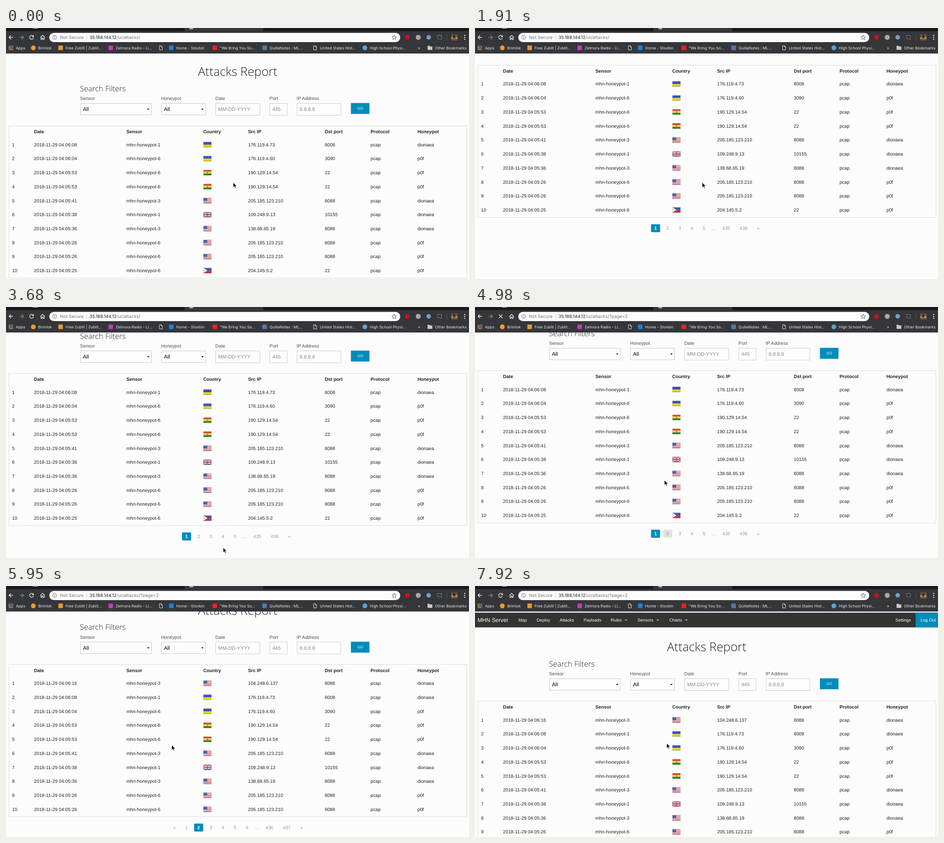
Animation of 1017x551 px, one loop 8000 ms. Source, as an HTML page:

```html
<!DOCTYPE html>
<html lang="en">
<head>
<meta charset="utf-8">
<title>Attacks Report</title>
<style>
html, body { margin: 0; width: 100%; height: 100%; overflow: hidden; background: #fcfcfc; }
svg { display: block; width: 1017px; height: 551px; }
text { font-family: "Liberation Sans", Arial, sans-serif; font-size: 10.25px; fill: #222; text-rendering: geometricPrecision; white-space: pre; }
.b { font-weight: bold; }
.title { font: 300 26.7px "Open Sans", sans-serif; }
.sub { font: 300 16.8px "Open Sans", sans-serif; }
.label { fill: #4d4d4d; }
.pick { font-size: 11.7px; fill: #000; }
.hint { font-size: 11px; fill: #888; }
.go { font-size: 8px; fill: #fff; }
.mid { text-anchor: middle; }
.dim { fill: #999; }
.white { fill: #fff; }
.brand { font-size: 12.3px; fill: #fff; }
.nav { font-size: 9.5px; fill: #fff; }
.mark { font: 8.45px Inter, Roboto, sans-serif; fill: #e8eaed; }
.url { font: 9.75px Inter, Roboto, sans-serif; fill: #202124; }
.soft { fill: #6f7377; }
</style>
</head>
<body>
<svg id="stage" viewBox="0 0 1017 551" xmlns="http://www.w3.org/2000/svg"></svg>
<script>
const BLUE = '#008cba', BAR = '#35363a', PALE = '#e8eaed', GREY = '#6f7377';

const text = (x, y, s, cls = '') => `<text x="${x}" y="${y}" class="${cls}">${s}</text>`;
const rect = (x, y, w, h, fill, more = '') =>
  `<rect x="${x}" y="${y}" width="${w}" height="${h}" fill="${fill}" ${more}/>`;
const dot = (x, y, r, fill) => `<circle cx="${x}" cy="${y}" r="${r}" fill="${fill}"/>`;
const line = (d, stroke, w = 1) => `<path d="${d}" fill="none" stroke="${stroke}" stroke-width="${w}"/>`;
const fill = (d, color) => `<path d="${d}" fill="${color}"/>`;
const times = (n, make) => Array.from({ length: n }, (_, i) => make(i)).join('');
const labels = (list, y, cls) => list.map(([s, x]) => text(x, y, s, cls)).join('');

// country flags, 18 by 12
const bands = (...colors) => colors.map((c, i) =>
  rect(0, i * 12 / colors.length, 18, 12 / colors.length, c)).join('');
const stripes = Array.from({ length: 9 }, (_, i) => i % 2 ? '#f6eeee' : '#cf3842');
const flags = {
  ua: bands('#3040b4', '#e9d820'),
  bo: bands('#d22f28', '#f0dc2c', '#27842b') + dot(9, 6, 1.6, '#a8762c'),
  us: bands(...stripes) + rect(0, 0, 8.5, 6.6, '#4256a2'),
  gb: rect(0, 0, 18, 12, '#243a94') + line('M0 0L18 12M18 0L0 12', '#f4f4f8', 2.4) +
    line('M0 0L18 12M18 0L0 12', '#d0303c', .8) + line('M9 0V12M0 6H18', '#f8f8fa', 4) +
    line('M9 0V12M0 6H18', '#d0303c', 2.2),
  ph: bands('#244ab2', '#d02a36') + fill('M0 0L9 6L0 12Z', '#f6f6f6') + dot(3, 6, 1.4, '#ecc93a')
};
const gloss = `<linearGradient id="gloss" x2="0" y2="1"><stop offset="0" stop-color="#fff" stop-opacity=".18"/>
  <stop offset=".5" stop-color="#fff" stop-opacity="0"/><stop offset="1" stop-opacity=".15"/></linearGradient>`;
const defs = '<defs>' + gloss + Object.entries(flags).map(([id, art]) =>
  `<symbol id="${id}" viewBox="0 0 18 12">${art}${rect(0, 0, 18, 12, 'url(#gloss)')}
  ${rect(.3, .3, 17.4, 11.4, 'none', 'stroke="#000" stroke-opacity=".3" stroke-width=".6"')}</symbol>`).join('') + '</defs>';

// time, sensor, country, address, port, honeypot
const attacks = [
  ['06:16', 3, 'us', '104.248.6.137', 8088, 'dionaea'],
  ['06:08', 1, 'ua', '176.119.4.73', 8008, 'dionaea'],
  ['06:04', 6, 'ua', '176.119.4.60', 3090, 'p0f'],
  ['05:53', 6, 'bo', '190.129.14.54', 22, 'p0f'],
  ['05:53', 6, 'bo', '190.129.14.54', 22, 'p0f'],
  ['05:41', 3, 'us', '205.185.123.210', 8088, 'dionaea'],
  ['05:38', 1, 'gb', '109.248.9.13', 10155, 'dionaea'],
  ['05:36', 3, 'us', '138.68.65.19', 8088, 'dionaea'],
  ['05:26', 6, 'us', '205.185.123.210', 8088, 'p0f'],
  ['05:26', 6, 'us', '205.185.123.210', 8088, 'p0f'],
  ['05:25', 6, 'ph', '204.145.5.2', 22, 'p0f']
];
const columns = [['Date', 61.5], ['Sensor', 264.5], ['Country', 433.2], ['Src IP', 531.7], ['Dst port', 700.2],
  ['Protocol', 800.7], ['Honeypot', 903.7]];

function row([time, sensor, flag, ip, port, pot], i) {
  const mid = 294 + i * 30.73, y = mid + 3.6;
  const cells = ['2018-11-29 04:' + time, 'mhn-honeypot-' + sensor, '', ip, port, 'pcap', pot];
  return text(13.3, y, i + 1) + cells.map((s, j) => text(columns[j][1], y, s)).join('') +
    `<use href="#${flag}" x="433.5" y="${mid - 6}" width="18" height="12"/>`;
}

function pager(names, current) {
  const items = names.split(' ');
  const size = s => s === '…' ? 16.6 : s.length * 5.7 + 20.9;
  let x = 509.4 - items.reduce((sum, s) => sum + size(s), 0) / 2;
  return items.map(s => {
    const mid = x + size(s) / 2, on = s === current;
    x += size(s);
    const box = on ? BLUE : s === '2' ? '#e2e2e2' : '';
    return (box && rect(mid - 10, 601.8, 20, 17.6, box, `rx="2" ${on ? '' : 'class="hover"'}`)) +
      text(mid, 614.2, s, on ? 'mid b white' : 'mid dim');
  }).join('');
}

const page = (id, list, names, current) =>
  `<g id="${id}">${list.map(row).join('')}${pager(names, current)}</g>`;

const field = (x, w, hint) =>
  rect(x + .5, 203.5, w - 1, 26, '#fdfdfd', 'stroke="#ccc"') + text(x + 6, 220.4, hint, 'hint');
const picker = (x, w) => rect(x + .5, 203.5, w - 1, 25.3, '#fdfdfd', 'stroke="#c8c8c8"') +
  text(x + 6, 220.3, 'All', 'pick') + fill(`M${x + w - 10} 215h5l-2.5 3z`, '#000');

const menu = [['Map', 95.2], ['Deploy', 135.5], ['Attacks', 186], ['Payloads', 238.4], ['Rules', 298], ['Sensors', 357],
  ['Charts', 426.7], ['Settings', 923.3], ['Log Out', 978.7]];
const navBar = rect(0, 58.5, 1017, 32.3, '#333') + rect(968, 58.5, 49, 32.3, BLUE) +
  text(5.5, 79.2, 'MHN Server', 'brand') + labels(menu, 78.2, 'nav') +
  [328, 398, 460.5].map(x => fill(`M${x} 73.2h7.4l-3.7 3.7z`, '#999')).join('');

const form = text(509, 143, 'Attacks Report', 'title mid') + text(162.3, 176.6, 'Search Filters', 'sub') +
  labels([['Sensor', 162.6], ['Honeypot', 340.7], ['Date', 459.8], ['Port', 578.8], ['IP Address', 638.3]], 196, 'label') +
  picker(163, 157) + picker(341, 98) + field(460, 98, 'MM-DD-YYYY') + field(579, 39, '445') + field(639, 97, '8.8.8.8') +
  rect(757.6, 202.7, 40.8, 24, BLUE) + text(778.2, 217.4, 'GO', 'go mid');

const table = rect(6.5, 252.8, 1006, 334, 'none', 'stroke="#ddd"') + labels(columns, 269.1, 'b');

// browser frame
const tabs = rect(0, 0, 1017, 56, BAR) + rect(0, 0, 392, 7, '#191a1d') + rect(565, 0, 452, 7, '#191a1d') +
  rect(59, 0, 11, 1, '#ddd') + rect(403, 0, 8, 3, '#a9abae');

const tools = line('M15.5 20.5H7M11 16.3L6.8 20.5L11 24.7', PALE, 1.4) +
  line('M30 20.5H38.5M34.3 16.3L38.5 20.5L34.3 24.7', '#85878b', 1.4) +
  `<g id="reload">${line('M59.7 17.8A4.3 4.3 0 1 0 60.5 21.6', PALE, 1.4)}${fill('M61 15.6V20H56.6Z', PALE)}</g>` +
  `<g id="stop">${line('M52.5 16.5l8 8m0-8l-8 8', PALE, 1.4)}</g>` +
  line('M75.5 20.8L80.5 16L85.5 20.8M77 20V25H79.3V21.8H81.7V25H84V20', PALE, 1.3) +
  rect(95, 10.7, 771, 20.2, '#fcfcfc', 'rx="10.1"') +
  line('M111.2 20.7a4.2 4.2 0 1 1-8.4 0a4.2 4.2 0 1 1 8.4 0M107 20.2V23M107 18V19.2', GREY, 1.1) +
  text(118.8, 24.2, 'Not Secure', 'url soft') + rect(176.5, 15.5, 1, 10.5, '#c4c6c8') +
  '<text x="183.4" y="24.2" class="url">35.188.144.12<tspan class="soft" id="path"></tspan></text>' +
  line('M852.8 15.6l1.5 3.4 3.7.3-2.8 2.4.9 3.6-3.3-1.9-3.3 1.9.9-3.6-2.8-2.4 3.7-.3z', '#5f6368') +
  dot(882, 20.5, 5.2, '#c3151c') + dot(905.5, 20.5, 5.5, '#a6a8aa') + dot(928.5, 20.5, 5, '#6f9fc8') +
  line('M946.5 18V16.5h10v8H952M946.5 20.5a4 4 0 0 1 4 4M946.5 23a1.5 1.5 0 0 1 1.5 1.5', '#85888c') +
  rect(968, 14, 1, 13, '#505156') +
  rect(978, 14, 14, 13.5, '#6d5638', 'rx="1.5"') + rect(978, 20, 14, 4, '#a98c60') + rect(982, 15.5, 5, 7, '#3d2f22') +
  times(3, i => dot(1007.5, 16.2 + i * 4.3, 1.2, PALE));

const sheet = x => line(`M${x - 3} 39h4l2.5 2.5v6.5h-6.5zM${x + 1} 39v2.5h2.5`, PALE);
const block = color => x => rect(x - 5, 38.5, 10, 10, color, 'rx="1"');
const disc = color => x => dot(x, 43.5, 5.2, color);
const folder = x => fill(`M${x - 5.5} 39h4l1.2 1.5h5.3v7.5h-10.5z`, '#c8cacc');
const grid = x => times(9, i => rect(x - 5 + i % 3 * 3.6, 38.6 + Math.floor(i / 3) * 3.6, 2.6, 2.6,
  ['#e25a4e', '#e8b53a', '#56a867', '#5a8fe0'][i * 3 % 4]));
const bookmarks = [
  [11, grid, 'Apps'], [60, disc('#f39a2b'), 'Brimlok'], [120, block('#e8963c'), 'Free Zublit | Zublit…'],
  [230, block('#c43bb4'), 'Zelmora Radio - Li…'], [340, sheet, ''], [363, block('#1684e6'), 'Home - Stovbin'],
  [458.7, block('#f0201c'), '"We Bring You So…'], [568, block('#5878a4'), 'QuillaNotes : ML…'],
  [678.7, sheet, 'United States Hist…'], [788.3, disc('#5aa5d8'), 'High School Physi…'], [894, () => '', '»'],
  [931.5, folder, 'Other Bookmarks']
].map(([x, icon, name]) => icon(x) + text(x + 10.8, 46.5, name, 'mark')).join('');

const stage = document.getElementById('stage');
stage.innerHTML = defs + rect(0, 0, 1017, 551, '#fcfcfc') + '<g id="page">' + navBar + form + table +
  page('first', attacks.slice(1), '1 2 3 4 5 … 435 436 »', '1') +
  page('second', attacks.slice(0, 10), '« 1 2 3 4 5 6 … 436 437 »', '2') + '</g>' + tabs + tools + bookmarks +
  '<path id="cursor" d="M0 0V11.2L2.6 8.9L4.3 12.9L6.2 12.1L4.5 8.2H7.9Z" fill="#000" stroke="#fff" stroke-width=".9"/>';

const $ = s => stage.querySelector(s);
const show = (s, on) => $(s).setAttribute('display', on ? 'inline' : 'none');

const LOOP = 8000, HOVER = 4210, CLICK = 4570, LOADED = 5090;
// bursts of screen updates: first, last, count
const bursts = [[1080, 2120, 6], [2330, 3330, 7], [3450, 4210, 5], [4570, 5270, 5], [5620, 6540, 6], [6690, 7450, 7], [7800, 7920, 2]];
// moves: begin, end, goal
const scrolls = [[986, 1998, 174], [2250, 3330, 124], [3360, 3640, 107], [3700, 4150, 113], [5080, LOADED, 0],
  [5500, 5955, 110], [7740, 7920, 0]];
const glides = [[2400, 3330, 474, 536], [3360, 3640, 477, 528], [3640, 4150, 424, 494], [CLICK, 4920, 416, 380],
  [4920, 5270, 370, 352], [5270, 5800, 364, 349], [6100, 6540, 358, 349], [6560, 7070, 905, 165],
  [7070, 7320, 640, 455], [7320, 7450, 421, 345]];

// latest screen update, on a 10 ms grid
function refresh(ms) {
  const burst = bursts.filter(b => b[0] <= ms).pop();
  if (!burst) return 0;
  const [a, b, n] = burst, step = (b - a) / (n - 1);
  const i = Math.min(n - 1, Math.floor((ms - a + 9) / step));
  return Math.floor((a + i * step) / 10) * 10;
}

const ease = p => p * p * (3 - 2 * p);
const follow = (from, moves, t) => moves.reduce((now, [a, b, ...goal]) => {
  const p = ease(Math.min(1, Math.max(0, (t - a) / (b - a))));
  return now.map((v, i) => v + (goal[i] - v) * p);
}, from);

function draw(ms) {
  const t = refresh(ms), loading = t >= CLICK && t < LOADED;
  const [top] = follow([38], scrolls, t), [x, y] = follow([499, 339], glides, t);
  $('#page').setAttribute('transform', `translate(0 ${-top})`);
  $('#cursor').setAttribute('transform', `translate(${x} ${y})`);
  show('#first', t < LOADED);
  show('#second', t >= LOADED);
  show('.hover', t >= HOVER);
  show('#stop', loading);
  show('#reload', !loading);
  $('#path').textContent = '/ui/attacks/' + (t >= CLICK ? '?page=2' : '');
}

const start = performance.now();
function tick() {
  draw((performance.now() - start) % LOOP);
  requestAnimationFrame(tick);
}
draw(0);
requestAnimationFrame(tick);
</script>
</body>
</html>
```
